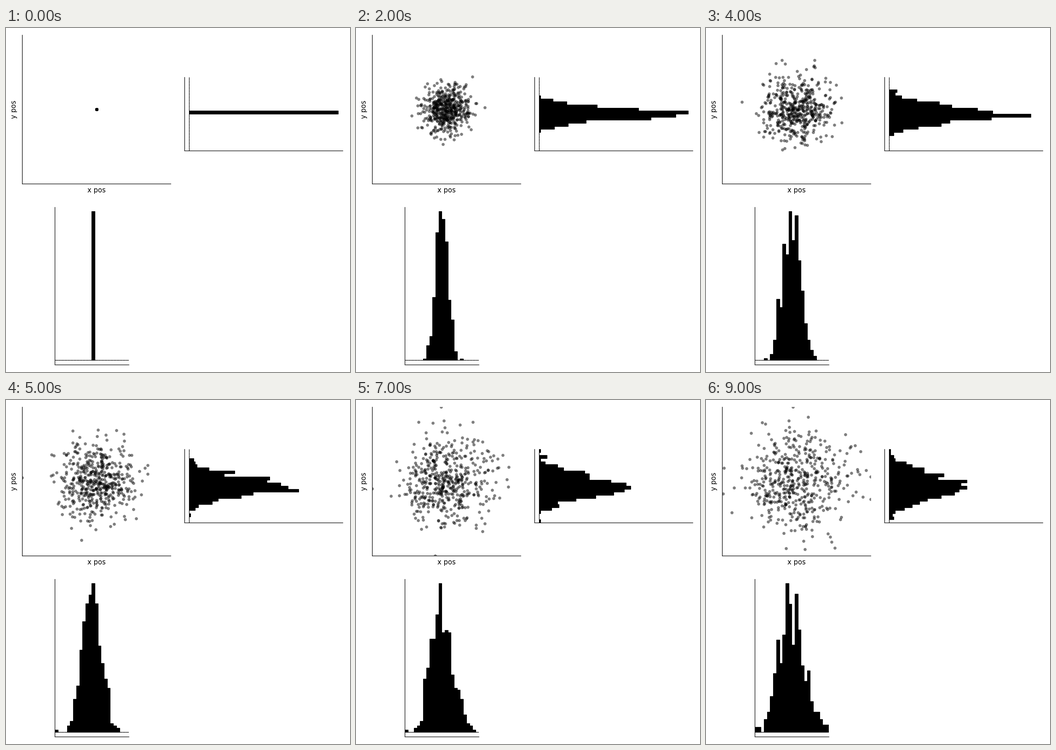
Write a matplotlib script that moves like this. It is 748 px wide and 749 px high and loops after 10000 ms.

```python
import numpy as np
import matplotlib.pyplot as plt
from matplotlib.animation import FuncAnimation

W, H, DPI = 748, 749, 100
FRAMES, COUNT = 10, 500
LIMIT, BINS = 9.0, 24
BIN = 2 * LIMIT / BINS
FULL = 98          # count that fills the side histogram
PAD = 0.03
LINE = 0.84        # in points

plt.rcParams["font.family"] = "DejaVu Sans"


def random_walk():
    """Every particle takes a unit normal step per second, kept inside the box."""
    rng = np.random.default_rng(7)
    pos = np.zeros((FRAMES, COUNT, 2))
    for t in range(1, FRAMES):
        step = rng.normal(size=(COUNT, 2))
        step = (step - step.mean(axis=0)) / step.std(axis=0)
        pos[t] = np.clip(pos[t - 1] + step, -LIMIT, LIMIT)
    return pos


def counts(v):
    return np.histogram(v, BINS, (-LIMIT, LIMIT))[0]


def add_panel(left, top, right, bottom):
    ax = fig.add_axes([left / W, 1 - bottom / H,
                       (right - left) / W, (bottom - top) / H])
    ax.set(xticks=[], yticks=[])
    ax.patch.set_visible(False)
    ax.spines[["top", "right"]].set_visible(False)
    ax.spines[["left", "bottom"]].set_linewidth(LINE)
    return ax


fig = plt.figure(figsize=(W / DPI, H / DPI), dpi=DPI, facecolor="white")
ax_dots = add_panel(35, 15, 358, 339)
ax_side = add_panel(388.4, 107, 732, 267)
ax_base = add_panel(106, 389.7, 266.6, 733)

label = dict(fontsize=10.6, ha="center", va="baseline", color="black")
fig.text(196.5 / W, 1 - 358 / H, "x pos", **label)
fig.text(22 / W, 1 - 177 / H, "y pos", rotation=90,
         rotation_mode="anchor", **label)

walk = random_walk()
mids = -LIMIT + BIN * (np.arange(BINS) + 0.5)
ink = dict(color="black", edgecolor="black", linewidth=LINE)
dots = ax_dots.scatter(*walk[0].T, s=23, c="black", alpha=0.5, linewidths=0)
side_bars = ax_side.barh(mids, np.zeros(BINS), height=BIN, **ink)
base_bars = ax_base.bar(mids, np.zeros(BINS), width=BIN, **ink)

span, share = (-LIMIT, LIMIT), (-PAD, 1 + PAD)
ax_dots.set(xlim=span, ylim=span)
ax_side.set(xlim=share, ylim=span)
ax_base.set(xlim=span, ylim=share)


def draw(t):
    dots.set_offsets(walk[t])
    nx, ny = (counts(v) for v in walk[t].T)
    for bar, n in zip(base_bars, nx / nx.max()):
        bar.set_height(n)
    for bar, n in zip(side_bars, ny / max(FULL, ny.max())):
        bar.set_width(n)
    return [dots, *side_bars, *base_bars]


anim = FuncAnimation(fig, draw, frames=FRAMES, interval=1000,
                     repeat=True, repeat_delay=0, blit=False)
plt.show()
```
